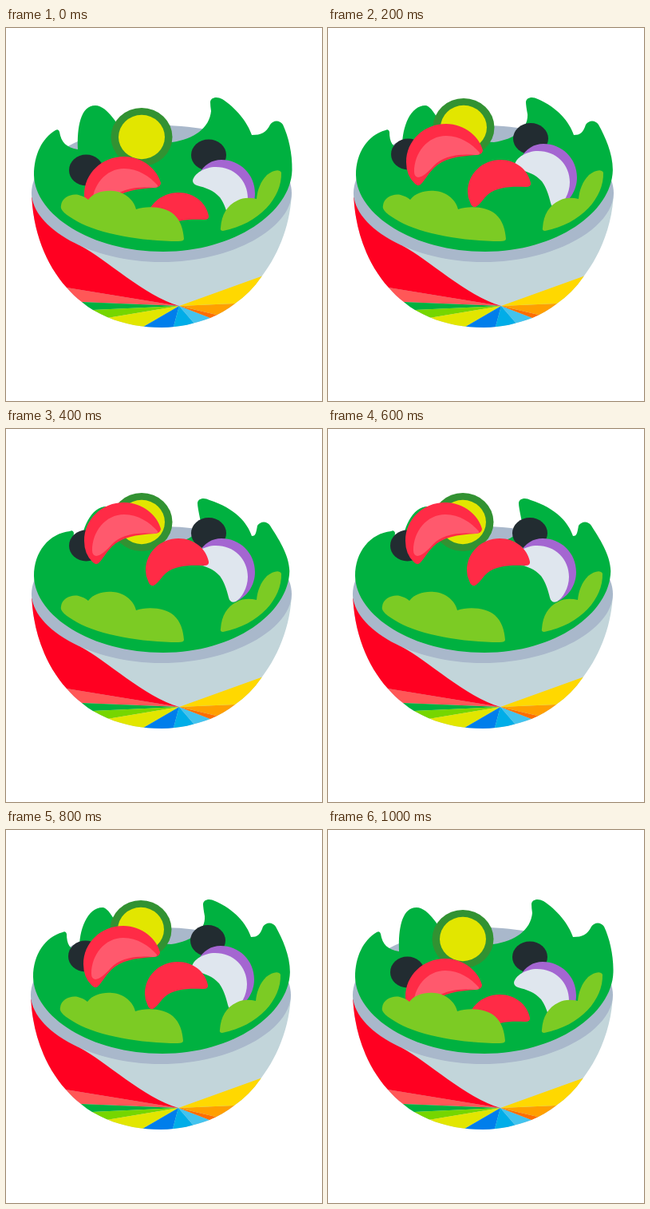
An HTML page for the animation above (1.1 s loop, 396x467 px).

```html
<!DOCTYPE html>
<html lang="en">
<head>
<meta charset="utf-8">
<title>Salad bowl</title>
<style>
html, body { margin: 0; width: 100%; height: 100%; overflow: hidden; background: #fff; }
svg { display: block; width: 100vw; height: 100vh; }
</style>
</head>
<body>
<svg viewBox="0 0 396 467">
  <defs>
    <clipPath id="bowlShape">
      <path d="M32 205C33 254 50 296 76 325C82 332 88 338 95 343Q102 349 109 353Q118 358 127 362C148 371 172 375 195 375C217 375 237 370 256 363Q273 356 287 345Q307 331 320.5 311C344 280 357 242 358 205Z"/>
    </clipPath>
  </defs>
  <g id="scene">
    <g clip-path="url(#bowlShape)">
      <path fill="#c2d5da" d="M20 190H370V390H20Z"/>
      <g id="wedges"></g>
      <path fill="#ff0021" d="M20 200L94 273C126 290 173 335 217 348L76 325L20 316Z"/>
    </g>
    <path fill="#a9b8cb" d="M32 207C32 160 105 122 195 122C285 122 358 160 358 207C357 250 285 293 195 293C105 293 33 250 32 207Z"/>
    <path id="leaf" fill="#00b140"/>
    <g id="cucumber">
      <ellipse cx="170" cy="116.5" rx="38.5" ry="36.5" fill="#329232"/>
      <ellipse cx="170" cy="116.5" rx="29" ry="27.7" fill="#e2e600"/>
    </g>
    <ellipse id="leftOlive" cx="100.5" cy="146" rx="21.5" ry="19.5" fill="#222c31"/>
    <ellipse id="rightOlive" cx="254" cy="130.5" rx="22" ry="19.5" fill="#222c31"/>
    <g id="onion">
      <path fill="#a466d1" d="M241 156C248 143 258 137 270 137C293 137 312 155 312 179C312 196 302 210 288 216L286 190L265 162Z"/>
      <path fill="#dfe6ee" d="M234 163C236 154 249 146 263 146C286 146 303 163 303 185C303 199 295 212 288 216C284 218 280 216 279 211C277 203 274 192 268 184C260 175 250 172 239 169Q234 167 234 163Z"/>
    </g>
    <g id="tomatoes">
      <path fill="#ff2b46" d="M98 140C98 113 120 92 148 92C172 92 190 109 194 125Q194 130 187 131C163 132 144 136 133 147C125 155 122 162 116 168Q112 171 108 166Q98 156 98 140Z"/>
      <path fill="#ff596d" d="M108 152C108 128 125 107 148 107C166 107 180 117 190 128Q191 131 185 131C161 129 143 133 132 145C124 154 119 158 113 159Q108 158 108 152Z"/>
      <path fill="#ff2b46" d="M175 177C175 154 194 137 216 137C236 137 251 150 254 166Q255 171 248 171C230 170 212 171 201 180C194 186 191 193 185 196Q180 197 178 190Q175 184 175 177Z"/>
    </g>
    <g fill="#7ccb24">
      <path d="M69 222C70 212 82 207 91 209Q99 211 103 215C110 206 122 203 134 204C149 205 161 216 163 227C178 222 200 224 210 233C219 241 222 252 223 264Q223 267 216 267C170 267 118 258 89 242C75 234 67 228 69 222Z"/>
      <path d="M269 250C270 234 277 222 290 216C297 212 306 212 314 214C315 203 319 192 327 184C334 178 343 176 345 181C346 212 318 245 272 254Q268 254 269 250Z"/>
    </g>
  </g>
</svg>
<script>
const STEP = 100, LOOP = 1100;
const el = id => document.getElementById(id);

// Rim points of the fan, with the colour that starts at each one.
const apex = [217, 348];
const fan = [
  [76, 325, '#ff5757'], [95, 343, '#00b140'], [109, 353, '#76d600'],
  [127, 363, '#e2e600'], [174, 373, '#007eeb'], [210, 374, '#00ade8'],
  [236, 370, '#43c3ee'], [256, 363, '#ff6d00'], [264, 359, '#ff9f00'],
  [287, 345, '#ffd800'], [320, 311]
];
const beyondRim = p => [0, 1].map(i => apex[i] + 1.4 * (p[i] - apex[i]));
el('wedges').innerHTML = fan.slice(0, -1).map((p, i) =>
  `<path fill="${p[2]}" d="M${apex}L${beyondRim(p)}L${beyondRim(fan[i + 1])}Z"/>`
).join('');

// Vertical drop below the raised position, for each pose.
const drops = {
  cucumber: [20, 12, 8, 4, 0],
  leftOlive: [32, 20, 12, 6, 0],
  rightOlive: [28.5, 16, 8, 4, 0],
  onion: [28, 16, 8, 4, 0],
  tomatoes: [69, 48, 28, 14, 0]
};
const sway = {
  left: [0, 6, 10, 14, 18],
  middle: [0, 5, 10, 12, 14],
  right: [0, 4, 8, 12, 16]
};

function leafPath(s, u, r) {
  return `M${62 + s} 128C${45 + 0.5 * s} ${138 - 0.4 * s} 35 ${159 - 0.3 * s} 35 184
    C36 234 107 280 197 280C286 280 ${357 - 0.2 * r} 231 ${358.5 - 0.2 * r} 178
    C${359 - 0.25 * r} 157 ${354 - 0.85 * r} 136 ${347 - r} 121
    C${343 - r} 115 ${335 - r} 115 ${331 - r} 121
    C${326 - 0.8 * r} 131 ${320 - 0.45 * r} 134 308 134
    C303 118 287 99 ${271 - r} 89
    C${264 - r} 85 ${256 - r} 87 ${256 - r} 93
    Q${256 - r} 97 ${257 - 0.87 * r} ${104 + 0.5 * r}
    C${255 - 0.5 * r} 125 236 139 208 143
    L150 140C144 125 ${127 + 0.4 * u} 97 ${112 + u} 97
    C${93 + u} 97 ${89 + 0.3 * u} 125 ${90 + 0.3 * u} 152
    C${76 + 0.5 * s} 150 ${69 + 0.8 * s} 143 ${67 + s} 130
    Q${66 + s} 126 ${62 + s} 128Z`;
}

function draw(time) {
  const step = Math.floor((time % LOOP) / STEP);
  const pose = Math.min(step, 10 - step, 4);
  const shift = step < 5 ? 0 : step === 5 ? -0.5 : -1;
  for (const id in drops) el(id).setAttribute('transform', `translate(0 ${drops[id][pose]})`);
  el('leaf').setAttribute('d', leafPath(sway.left[pose], sway.middle[pose], sway.right[pose]));
  el('scene').setAttribute('transform', `translate(${shift} 0)`);
}

const start = performance.now();
function tick() {
  draw(performance.now() - start);
  requestAnimationFrame(tick);
}
tick();
</script>
</body>
</html>
```
